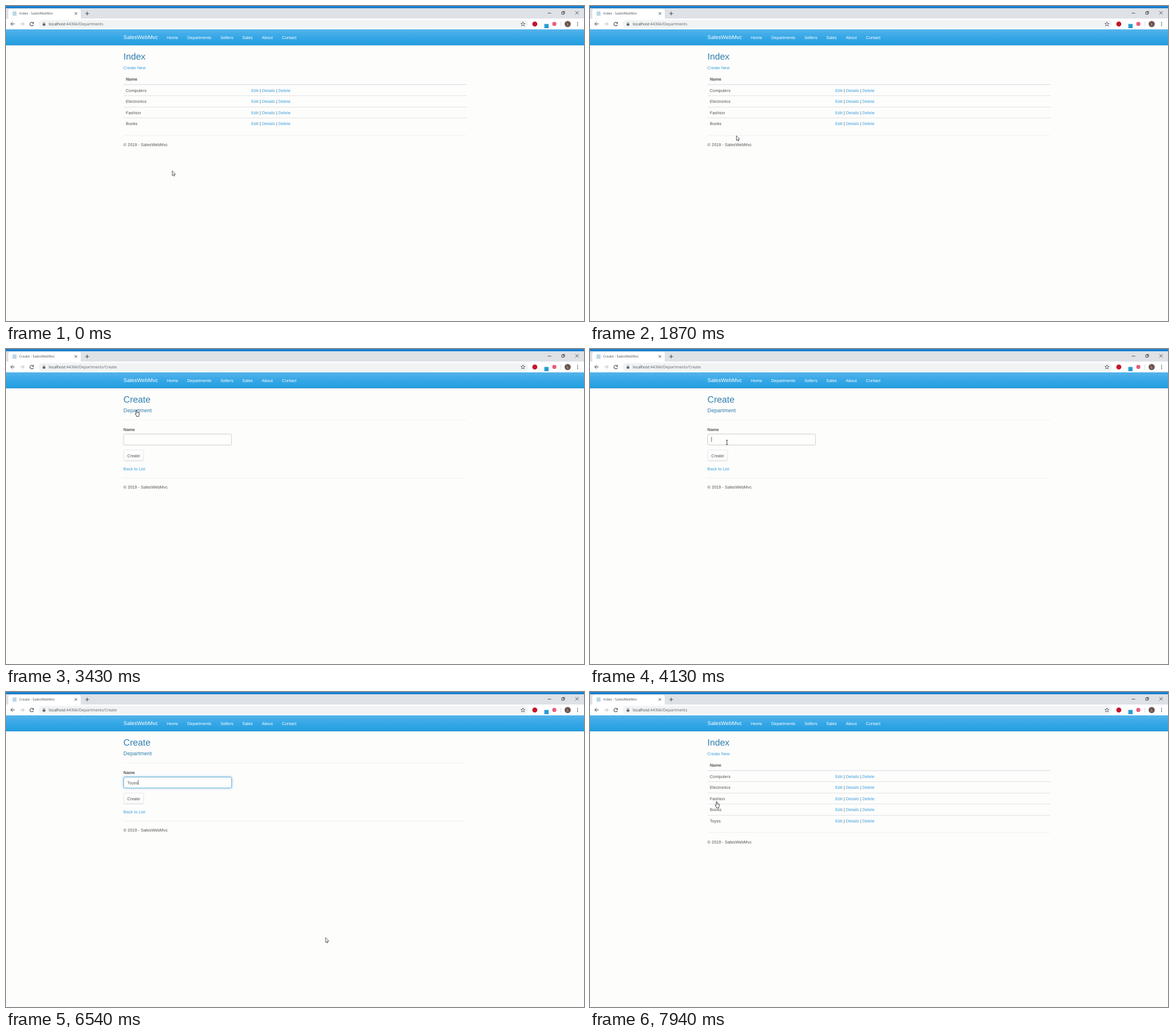
An HTML page with a canvas that plays this animation: 1013x553 px, repeating every 8 s.

```html
<!DOCTYPE html>
<html lang="en">
<head>
<meta charset="utf-8">
<title>Departments</title>
<style>
html, body { margin: 0; width: 100%; height: 100%; overflow: hidden; background: #fdfdfc; }
canvas { display: block; }
</style>
</head>
<body>
<canvas id="stage" width="1013" height="553"></canvas>
<script>
const ctx = document.getElementById('stage').getContext('2d');
const LOOP = 8000;
const ZOOM = 1013 / 1920;
const SANS = '"Liberation Sans", Arial, sans-serif';
const UI = '"Open Sans", "Noto Sans", sans-serif';
const TEXT = '#555', LINK = '#3a9fdc', HEADING = '#317eac';
const LEFT = 205.8;

const OPEN_FORM = 3430, FOCUS = 4100, HIDE_POINTER = 4770, SHOW_POINTER = 6470;
const PRESS = 7520, SAVED = 7740;
const KEYS = [[5170, 'T'], [5600, 'o'], [5770, 'y'], [6070, 's'], [6270, 's']];

// time, x, y of the pointer's hot spot
const PATH = [
  [0, 291, 289], [1200, 291, 289], [1460, 109, 60], [1580, 109, 60],
  [1900, 271, 244], [2050, 271, 244], [2100, 269, 237], [2580, 269, 237],
  [2770, 258, 174], [2960, 232, 108], [3170, 229, 107], [3600, 229, 107],
  [3960, 240, 164], [6470, 562, 438], [6540, 560, 431], [6700, 520, 400],
  [7050, 252, 214], [7270, 222, 192], [LOOP, 222, 192]
];

const clamp = v => Math.max(0, Math.min(1, v));
const smooth = v => v * v * (3 - 2 * v);

function rect(x, y, w, h, color) {
  ctx.fillStyle = color;
  ctx.fillRect(x, y, w, h);
}

function round(x, y, w, h, r, fill, stroke, width = 1) {
  ctx.beginPath();
  ctx.roundRect(x, y, w, h, r);
  if (fill) { ctx.fillStyle = fill; ctx.fill(); }
  if (stroke) { ctx.strokeStyle = stroke; ctx.lineWidth = width; ctx.stroke(); }
}

function disc(x, y, r, color) {
  ctx.fillStyle = color;
  ctx.beginPath();
  ctx.arc(x, y, r, 0, Math.PI * 2);
  ctx.fill();
}

function trace(points, color, width = 1, close = false, fill = null) {
  ctx.beginPath();
  points.forEach(([x, y]) => ctx.lineTo(x, y));
  if (close) ctx.closePath();
  if (fill) { ctx.fillStyle = fill; ctx.fill(); }
  ctx.strokeStyle = color;
  ctx.lineWidth = width;
  ctx.stroke();
}

// Sizes are page pixels, positions are stage pixels; returns the drawn width.
function text(str, x, y, color = TEXT, size = 14, family = SANS, weight = 400) {
  ctx.save();
  ctx.translate(x, y);
  ctx.scale(ZOOM, ZOOM);
  ctx.font = `${weight} ${size}px ${family}`;
  ctx.textRendering = 'geometricPrecision';
  ctx.fillStyle = color;
  ctx.fillText(str, 0, 0);
  const width = ctx.measureText(str).width * ZOOM;
  ctx.restore();
  return width;
}

function gradient(y0, y1, ...colors) {
  const g = ctx.createLinearGradient(0, y0, 0, y1);
  colors.forEach((c, i) => g.addColorStop(i / (colors.length - 1), c));
  return g;
}

function drawTabs(title) {
  rect(0, 0, 1013, 4, '#1a80cf');
  rect(0, 4, 1013, 18, '#dee1e6');
  round(4, 5, 127, 18, [4, 4, 0, 0], '#fff');
  rect(11.5, 9.5, 7, 7.5, '#b9d7e6');
  text(title + ' - SalesWebMvc', 23, 15.4, '#4b4f54', 11.6, UI);
  trace([[120.4, 11], [124.6, 15.2]], '#45484c');
  trace([[124.6, 11], [120.4, 15.2]], '#45484c');
  trace([[139, 13.2], [145.6, 13.2]], '#45484c');
  trace([[142.3, 9.9], [142.3, 16.5]], '#45484c');
  trace([[949.5, 12.5], [955.5, 12.5]], '#333', 0.8);
  trace([[975.4, 10.6], [975.4, 9.5], [979, 9.5], [979, 13.2], [977.8, 13.2]], '#333', 0.8);
  ctx.strokeRect(974, 10.8, 3.7, 3.7);
  trace([[998, 9.3], [1003.4, 14.7]], '#333', 0.8);
  trace([[1003.4, 9.3], [998, 14.7]], '#333', 0.8);
}

function drawArrow(x, dir, color) {
  trace([[x - 3.5 * dir, 31.5], [x + 3.5 * dir, 31.5]], color);
  trace([[x, 28], [x - 3.5 * dir, 31.5], [x, 35]], color);
}

function drawToolbar(path) {
  rect(0, 22, 1013, 19, '#fff');
  drawArrow(11.8, 1, '#4d5156');
  drawArrow(28.4, -1, '#b9bcc0');
  ctx.beginPath();
  ctx.arc(45.2, 31.6, 3.1, 0.4, 5.5);
  ctx.strokeStyle = '#4d5156';
  ctx.lineWidth = 1.1;
  ctx.stroke();
  trace([[48.6, 28], [48.6, 31], [45.8, 31]], '#4d5156', 0.3, true, '#4d5156');

  round(57, 24.5, 858, 14.2, 7.1, '#f1f3f4');
  round(64.3, 30.7, 4.6, 3.8, 0.5, '#5f6368');
  ctx.beginPath();
  ctx.arc(66.6, 30.2, 1.4, Math.PI, 0);
  ctx.strokeStyle = '#5f6368';
  ctx.lineWidth = 0.8;
  ctx.stroke();
  const host = text('localhost', 75, 34.2, '#3c4043', 13.1, UI);
  text(':44366/' + path, 75 + host, 34.2, '#5f6368', 13.1, UI);

  const star = Array.from({ length: 10 }, (_, i) => {
    const a = i * Math.PI / 5 - Math.PI / 2, r = i % 2 ? 1.7 : 3.9;
    return [906 + r * Math.cos(a), 31.8 + r * Math.sin(a)];
  });
  trace(star, '#4d5156', 0.8, true);
  disc(926.8, 31.6, 4.4, '#c4162a');
  rect(943.5, 31.5, 7.5, 7.5, '#2b9bd3');
  disc(961, 31.4, 3.6, '#e8607a');
  rect(972, 27, 1, 9, '#dadce0');
  disc(984.4, 31.6, 5.4, '#6d5550');
  text('L', 982.9, 34, '#f0e8e6', 11, UI);
  for (const y of [28.8, 31.6, 34.4]) disc(1001.7, y, 0.85, '#4d5156');
}

function drawNavbar() {
  rect(0, 41, 1013, 28, gradient(41, 68, '#54b4eb', '#36a7e6', '#249fe0'));
  rect(0, 68, 1013, 1, '#2a93d2');
  rect(0, 69, 1013, 1, '#f0f3f4');
  text('SalesWebMvc', LEFT, 58, '#fff', 18);
  const items = { Home: 282, Departments: 317.7, Sellers: 375.8, Sales: 414, About: 448.2, Contact: 483.6 };
  for (const name in items) text(name, items[name], 57.5, '#fff');
}

function drawFooter(lineY, textY) {
  rect(206, lineY, 601, 1, '#f0f0ee');
  text('© 2019 - SalesWebMvc', LEFT, textY);
}

function drawIndex(names, hoverLink) {
  text('Index', LEFT, 93.6, HEADING, 30);
  const link = hoverLink ? '#157ab5' : LINK;
  const width = text('Create New', LEFT, 110.8, link);
  if (hoverLink) rect(LEFT, 111.6, width, 0.6, link);
  text('Name', 210, 130.8, TEXT, 14, SANS, 700);
  rect(206, 137.5, 601, 1, '#d6d8df');
  const pitch = 37 * ZOOM;
  names.forEach((name, i) => {
    const y = 150.9 + i * pitch;
    if (i) rect(206, Math.round(137.7 + i * pitch), 601, 1, '#e2e3e5');
    text(name, 210, y);
    let x = 429.9;
    ['Edit', ' | ', 'Details', ' | ', 'Delete'].forEach((part, k) => {
      x += text(part, x, y, k % 2 ? TEXT : LINK);
    });
  });
  const end = names.length * pitch;
  drawFooter(Math.round(148.6 + end), 167.9 + end);
}

function drawField(t) {
  const glow = smooth(clamp((t - FOCUS - 60) / 210));
  const box = [206.2, 149.3, 189.2, 19.2, 2];
  ctx.save();
  ctx.shadowColor = `rgba(102,175,233,${0.75 * glow})`;
  ctx.shadowBlur = 5;
  round(...box, '#fefefd');
  ctx.restore();
  round(...box, null, '#c6cbc8', 0.9);
  ctx.globalAlpha = glow;
  round(...box, null, '#62afdc', 0.9);
  ctx.globalAlpha = 1;

  const typed = KEYS.filter(k => k[0] <= t);
  const word = typed.map(k => k[1]).join('');
  const caretX = 212.6 + text(word, 212.6, 161.5);
  const reset = typed.length ? typed[typed.length - 1][0] : FOCUS;
  if (t >= FOCUS && t < PRESS && (t - reset) % 1060 < 530) {
    rect(caretX, 154.4, 0.8, 8.6, '#444');
  }
}

function drawButton(t) {
  const pressed = t >= PRESS, hover = t >= 7200;
  const fill = pressed ? '#cbcbcb' : hover ? '#e8e8e8' : gradient(177, 197, '#fff', '#f9f9f9');
  round(206.2, 177.3, 35.2, 19.2, 2, fill, '#e3e3e3', 0.9);
  if (!pressed) rect(207.5, 196, 32.6, 0.8, '#d4d4d4');
  else round(206, 177.1, 35.6, 19.6, 1.5, null, '#82a4df', 1.5);
  text('Create', 212.6, 189.7);
}

function drawForm(t) {
  text('Create', LEFT, 93.6, HEADING, 30);
  text('Department', LEFT, 111.3, HEADING, 18);
  rect(206, 124, 601, 1, '#f1f1ef');
  text('Name', LEFT, 143.7, TEXT, 14, SANS, 700);
  drawField(t);
  drawButton(t);
  text('Back to List', LEFT, 212.7, LINK);
  drawFooter(226, 244.9);
}

function pointerAt(t) {
  const i = Math.max(1, PATH.findIndex(p => p[0] > t));
  const [a, b] = [PATH[i - 1], PATH[i]];
  const k = clamp((t - a[0]) / (b[0] - a[0]));
  return [a[1] + (b[1] - a[1]) * k, a[2] + (b[2] - a[2]) * k];
}

function drawPointer(t) {
  if (t >= HIDE_POINTER && t < SHOW_POINTER) return;
  const [x, y] = t >= FOCUS && t < HIDE_POINTER ? [240, 164] : pointerAt(Math.min(t, t < HIDE_POINTER ? 3959 : LOOP - 1));
  const hand = (t > 2930 && t < 3620) || t > 7200;
  const beam = t > 3860 && t < HIDE_POINTER;
  ctx.save();
  ctx.translate(x, y);
  ctx.lineJoin = 'round';
  if (beam) {
    trace([[-1.9, -3.8], [1.9, -3.8]], '#333', 0.8);
    trace([[0, -3.8], [0, 3.8]], '#333', 0.9);
    trace([[-1.9, 3.8], [1.9, 3.8]], '#333', 0.8);
  } else if (hand) {
    ctx.beginPath();
    ctx.moveTo(-0.8, 0.8);
    ctx.quadraticCurveTo(0.2, -0.8, 1, 0.8);
    ctx.lineTo(1, 4.2);
    ctx.lineTo(4.2, 4.8);
    ctx.quadraticCurveTo(5.2, 5.2, 5, 6.6);
    ctx.lineTo(3.9, 9.6);
    ctx.lineTo(3.8, 11.4);
    ctx.lineTo(-0.3, 11.4);
    ctx.lineTo(-0.6, 9.8);
    ctx.lineTo(-2.8, 6.8);
    ctx.quadraticCurveTo(-2.6, 5.4, -0.8, 6.8);
    ctx.closePath();
    ctx.fillStyle = '#fff';
    ctx.fill();
    ctx.strokeStyle = '#333';
    ctx.lineWidth = 0.9;
    ctx.stroke();
    trace([[2.3, 4.6], [2.3, 6.2]], '#555', 0.5);
    trace([[3.7, 4.8], [3.7, 6.3]], '#555', 0.5);
  } else {
    trace([[0.3, 0.4], [0.3, 8.8], [2.2, 7.1], [3.4, 9.8], [4.6, 9.2], [3.5, 6.6], [6, 6.4]],
      '#33363d', 0.8, true, '#fff');
  }
  ctx.restore();
}

function draw(t) {
  const form = t >= OPEN_FORM && t < SAVED;
  rect(0, 0, 1013, 553, '#fdfdfc');
  drawTabs(form ? 'Create' : 'Index');
  drawToolbar(form ? 'Departments/Create' : 'Departments');
  drawNavbar();
  if (form) {
    drawForm(t);
  } else {
    const names = ['Computers', 'Electronics', 'Fashion', 'Books'];
    if (t >= SAVED) names.push('Toyss');
    drawIndex(names, t > 2930 && t < OPEN_FORM);
  }
  drawPointer(t);
}

const start = performance.now();
function tick() {
  draw((performance.now() - start) % LOOP);
  requestAnimationFrame(tick);
}
tick();
</script>
</body>
</html>
```
